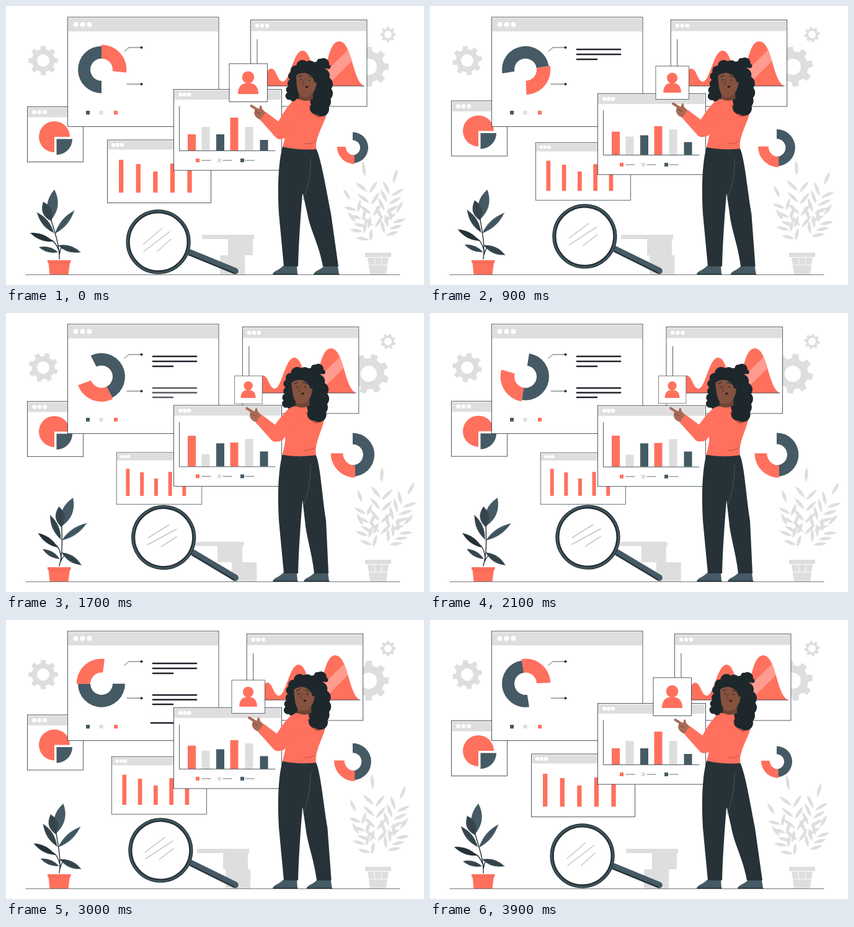
Recreate the animation shown at these times as an HTML page. Size 674 by 450 pixels, loop 4 s.

```html
<!DOCTYPE html>
<html lang="en">
<head>
<meta charset="utf-8">
<title>Data dashboard</title>
<style>
html, body { margin: 0; width: 100%; height: 100%; overflow: hidden; background: #fff; }
svg { display: block; width: 674px; height: 450px; }
</style>
</head>
<body>
<svg id="stage" viewBox="0 0 674 450"></svg>
<script>
const LOOP = 4000, STEP = 100;
const CORAL = '#ff705d', DARK = '#263238', SLATE = '#455a64', GREY = '#dedede';
const SKIN = '#85523f', HAND = '#a96a55', HAIR = '#1d272c';
const svg = document.getElementById('stage');

const box = (x, y, w, h, fill, more = '') =>
  `<rect x="${x}" y="${y}" width="${w}" height="${h}" fill="${fill}" ${more}/>`;
const dot = (x, y, r, fill) => `<circle cx="${x}" cy="${y}" r="${r}" fill="${fill}"/>`;
const shape = (d, fill, more = '') => `<path d="${d}" fill="${fill}" ${more}/>`;
const line = (d, w = 0.8, color = DARK) =>
  `<path d="${d}" fill="none" stroke="${color}" stroke-width="${w}" stroke-linecap="round" stroke-linejoin="round"/>`;
const group = (id, body) => `<g id="${id}">${body}</g>`;

// White panel with a grey title bar and three round buttons
function panel(x, y, w, h, bar, dx, gap, r) {
  const buttons = [0, 1, 2].map(i => dot(x + dx + i * gap, y + bar / 2 + 0.5, r, '#fff')).join('');
  return box(x, y, w, h, '#fff') + box(x + 1, y + 1.5, w - 2, bar - 1, GREY) + buttons +
    box(x, y, w, h, 'none', `stroke="${DARK}" stroke-width="0.8"`);
}

// Ring slice around 0,0; angles in degrees clockwise from the top
function slice(a, b, outer, inner, fill) {
  const at = (r, deg) => {
    const t = deg * Math.PI / 180;
    return (r * Math.sin(t)).toFixed(2) + ' ' + (-r * Math.cos(t)).toFixed(2);
  };
  return shape(`M${at(outer, a)}A${outer} ${outer} 0 0 1 ${at(outer, b)}L${at(inner, b)}A${inner} ${inner} 0 0 0 ${at(inner, a)}Z`, fill);
}

function leaf(x0, y0, x1, y1, w, fill, vein) {
  const len = Math.hypot(x1 - x0, y1 - y0);
  const nx = -(y1 - y0) / len * w, ny = (x1 - x0) / len * w;
  const mx = (x0 + x1) / 2, my = (y0 + y1) / 2;
  return shape(`M${x0} ${y0}Q${mx + nx} ${my + ny} ${x1} ${y1}Q${mx - nx} ${my - ny} ${x0} ${y0}Z`, fill) +
    (vein ? line(`M${x0} ${y0}L${x1} ${y1}`, 0.6, vein) : '');
}

// Cog around 0,0
function cog(r, hole, teeth) {
  const pts = [];
  for (let i = 0; i < teeth; i++) {
    [[-0.3, 0.77], [-0.19, 1], [0.19, 1], [0.3, 0.77]].forEach(([o, k]) => {
      const a = (i + o) / teeth * 2 * Math.PI;
      pts.push((r * k * Math.sin(a)).toFixed(1) + ' ' + (-r * k * Math.cos(a)).toFixed(1));
    });
  }
  return shape('M' + pts.join('L') + 'Z', GREY) + dot(0, 0, hole, '#fff');
}

// Leaves in pairs along a twig, with one at its end
function twig(x0, y0, x1, y1, pairs, size) {
  const a = Math.atan2(y1 - y0, x1 - x0);
  const put = (x, y, dir, len) =>
    leaf(x, y, x + len * Math.cos(dir), y + len * Math.sin(dir), 5.5, GREY);
  let out = '';
  for (let i = 0; i < pairs; i++) {
    const k = 0.35 + 0.6 * i / pairs;
    const x = x0 + (x1 - x0) * k, y = y0 + (y1 - y0) * k;
    out += put(x, y, a - 0.75, size) + put(x + 2, y + 3, a + 0.75, size);
  }
  return out + put(x1, y1, a, size);
}

// x, height at rest, height at full swing, colour
const bars = [
  [293, 26, 50.3, CORAL], [315.5, 38, 19, GREY], [339, 26, 37.7, SLATE],
  [361.5, 53, 38, CORAL], [385.5, 38, 44.5, GREY], [409.5, 17, 24.4, SLATE]
];

const cogs = [[60, 88, 24, 10], [616, 46, 12.5, 6], [585, 98, 32.5, 13]];

const legend = (xs, y) => xs.map((x, i) => box(x - 3, y - 3, 6, 6, [CORAL, GREY, SLATE][i])).join('');

const rows = (x, ends, ys) => ys.map((y, i) => line(`M${x + 1} ${y}H${ends[i] - 1}`, 2.7, '#20222c')).join('');

const wave = 'M11 129C20 129 24 101 33 101C42 101 43 122 52 122C63 122 69 72 83.5 72C100 72 100 124 111 124C122 124 122 57 142.5 57C164 57 164 121 183 129Z';

const backdrop =
  cogs.map(([, , r, hole], i) => group('cog' + i, cog(r, hole, 8))).join('') +
  line('M32 433.5H635', 0.8, '#555') +
  group('palm',
    twig(600, 398, 579, 275, 4, 25) + twig(597, 375, 624, 286, 4, 24) +
    twig(596, 380, 555, 313, 3, 21) + twig(600, 385, 629, 334, 3, 22) +
    twig(597, 392, 564, 349, 2, 21)) +
  shape('M579 398H621V405H617L613 433H587L583 405H579Z', GREY) +
  line('M583 405.5H617M585 418H615M594 407L595 417M606 407L605 417', 0.9, '#fff') +
  group('boxLow', box(345, 402, 40, 31, GREY)) +
  group('boxTop', box(316, 369, 84, 7, GREY) + box(358, 375, 40, 27, GREY));

const wavePanel = group('waves',
  panel(0, 22.5, 187.5, 139.5, 17.5, 10.5, 8, 3.2) +
  `<clipPath id="hill"><path d="${wave}"/></clipPath>` + shape(wave, CORAL) +
  shape('M108 119L172 56L182 70L118 134Z', '#ff9c8f', 'clip-path="url(#hill)"') +
  line('M10.5 54V129H183'));

const piePanel = group('pie',
  panel(34.5, 162.5, 90, 89, 16.5, 11, 8.5, 3.4) +
  shape('M78 211V236A25 25 0 1 1 103 211Z', CORAL) +
  shape('M81.5 214.5H107A25.5 25.5 0 0 1 81.5 240Z', SLATE));

const mainPanel =
  panel(99.5, 18, 243.5, 176.5, 22.5, 13, 11, 4) +
  `<g transform="translate(154 102.7)">${group('ring', slice(180, 360, 38, 18, SLATE) + slice(0, 97, 40.3, 18, CORAL))}</g>` +
  line('M191 73L198 67H218M195 126H218') + dot(218.5, 67, 2.1, DARK) + dot(218.5, 126, 2.1, DARK) +
  group('rows0', rows(236, [308, 308, 270], [70, 78, 86])) +
  group('rows1', rows(236, [308, 308, 270], [121, 128.5, 136])) +
  group('rows2', rows(233, [300], [166])) +
  box(129, 169, 6, 6, SLATE) + box(150.5, 169, 6, 6, GREY) + box(174, 169, 6, 6, CORAL);

const smallPanel = group('small',
  panel(163.5, 216, 167, 101.5, 15, 9.5, 7, 3.2) +
  [248, 255, 267, 254, 240].map((y, i) => box(182 + i * 27.6, y, 7.3, 301 - y, CORAL)).join(''));

const barPanel = group('chart',
  panel(270.5, 134.5, 174, 130.5, 16, 10.5, 7, 3.3) +
  bars.map(([x, h, , c], i) => box(x, 233 - h, 13, h, c, `id="bar${i}"`)).join('') +
  line('M279.5 162V233.5H434') +
  legend([309, 344, 381], 249) + line('M316 249H330M350 249H364M386 249H400', 0.7));

const card = group('card',
  box(360, 93, 61.4, 61.4, '#fff', `stroke="${DARK}" stroke-width="0.8"`) +
  dot(390.5, 115, 9.8, CORAL) +
  shape('M374 142C374 129 381 124 390.5 124S407 129 407 142Z', CORAL));

const sideRing = group('side',
  slice(0, 180, 25, 12, SLATE) +
  `<g transform="translate(2.8 -1.6)">${slice(180, 270, 28, 14, CORAL)}</g>`);

const lens = group('lens',
  line('M296 397.5L369.5 427.5', 10.5, SLATE) + line('M296 401.5L368 431', 2, DARK) +
  `<circle cx="245.6" cy="380.5" r="49" fill="#fff" stroke="${DARK}" stroke-width="6.2"/>` +
  `<circle cx="245.6" cy="380.5" r="49.6" fill="none" stroke="${SLATE}" stroke-width="2.2"/>` +
  line('M221 385L251 359M222 396L264 364M244 396L266 376', 0.7, '#777'));

const plant = group('plant',
  line('M86 408C87 390 79 365 72 343M86 396Q80 380 72 377M86 402Q88 388 92 387', 1.4) +
  leaf(72, 346, 78, 296, 17, SLATE) + leaf(73, 347, 60, 316, 15, '#37474f', DARK) +
  leaf(79, 367, 110, 330, 10, SLATE, DARK) + leaf(77, 366, 50, 333, 10, '#37474f', DARK) +
  leaf(76, 380, 39, 366, 9, DARK) + leaf(84, 397, 53, 389, 8, '#37474f') +
  leaf(84, 386, 120, 397, 10, '#37474f', DARK)) +
  shape('M67 410H104.5V414H103L100.5 433H70.5L68.5 414H67Z', CORAL) + line('M69 414.5H102', 0.6, '#d95c4c');

const curls = [
  [478, 97, 10], [467, 104, 8], [462, 113, 7], [461, 125, 7], [458, 135, 6.5], [457, 145, 6.5], [463, 149, 5],
  [490, 98, 10], [500, 102, 12], [511, 112, 11], [515, 126, 12], [515, 141, 12], [511, 154, 13],
  [509, 166, 12], [500, 165, 10], [512, 93, 9], [506, 90, 5], [520, 98, 3.5]
].map(c => dot(...c, HAIR)).join('');

const head =
  shape('M464 110C470 92 496 90 508 102C524 112 526 160 512 172C500 178 491 166 490 150H466Q456 150 458 136Z', HAIR) + curls +
  shape('M473 134L495 130V150Q484 156 472 150Z', '#6f4434') +
  shape('M468 112Q472 102 484 103Q500 106 501 122C500 137 492 147 481 147C471 147 468 134 468 112Z', SKIN) +
  shape('M465 114C468 98 496 94 503 122L498 124Q495 111 483 108Q473 107 465 114Z', HAIR) +
  line('M472 114L478 112M487 113L493 115', 1.2) + dot(475.5, 119, 1.3, DARK) + dot(489.5, 120, 1.3, DARK) +
  line('M481 118L478 126L481 127', 0.8, '#54301f') +
  `<ellipse cx="485" cy="130.5" rx="2.4" ry="1.8" fill="#3a1c18"/>`;

const woman =
  shape('M430 433C431 427 441 426 447 419H469L470 433Z', SLATE) + line('M431 432.5H470', 1.4) +
  group('shoe', shape('M496 433C497 427 508 426 513 419H535L537 433Z', SLATE) + line('M497 432.5H537', 1.4)) +
  `<path id="leg" fill="${DARK}"/>` +
  shape('M446 227C438 256 438 300 440 335L448 420H471C472 380 475 340 478 303L492 300L500 229Z', DARK) +
  line('M491 246C492 270 485 300 479 312', 0.7, '#52646c') +
  group('body',
    shape('M466 150C456 156 452 170 452 205L446 227Q470 233 500 231L500 222C504 200 516 185 517 172C512 158 500 150 490 149Z', CORAL) +
    shape('M488 160L515 168Q513 178 505 180Q494 178 488 160Z', '#b9503f') +
    line('M482 222Q491 223 498 219', 0.8, '#a8483b') + head) +
  `<path id="upper" fill="none" stroke="${CORAL}" stroke-width="24" stroke-linecap="round"/>` +
  group('arm',
    line('M395.5 161L405 167', 4, HAND) +
    shape('M402 164L408 166L410 160Q413 161 413 166L420 173L413 184Q402 182 400 173Z', HAND) +
    line('M403 170L409 173', 0.7, '#54301f') +
    shape('M419 171L443 189L452 207Q445 219 436 213L410 184Z', CORAL));

svg.innerHTML = backdrop + plant + wavePanel + piePanel + mainPanel + smallPanel + barPanel + card + sideRing + lens + woman;

const part = {};
svg.querySelectorAll('[id]').forEach(e => part[e.id] = e);
const move = (id, value) => part[id].setAttribute('transform', value);
const clamp = v => Math.max(0, Math.min(1, v));
const scaleAt = (x, y, s) => `translate(${x} ${y}) scale(${s}) translate(${-x} ${-y})`;

function draw(ms) {
  const t = Math.floor(ms % LOOP / STEP) * STEP;
  const turn = t / LOOP * 360;
  // Swing out and back, taken at the middle of each step
  const p = (1 - Math.cos(2 * Math.PI * (t + STEP / 2) / LOOP)) / 2;
  const q = p * (2 - p);

  cogs.forEach(([x, y], i) => move('cog' + i, `translate(${x} ${y}) rotate(${turn})`));
  move('ring', `rotate(${turn})`);
  move('waves', `translate(${394.5 - 13.7 * p} 0)`);
  move('pie', `translate(0 ${-20.6 * p})`);
  move('small', scaleAt(247, 266.7, 1 - 0.183 * p));
  move('chart', `translate(0 ${15 * p})`);
  bars.forEach(([, a, b], i) => {
    const h = a + (b - a) * p;
    part['bar' + i].setAttribute('y', 233 - h);
    part['bar' + i].setAttribute('height', h);
  });
  move('card', scaleAt(390.7, 123.7, 1 - 0.28 * p));
  move('side', `translate(559 228.5) scale(${1 + 0.42 * p})`);
  move('lens', `rotate(${9 * p} 372 428)`);
  move('plant', `rotate(${16.2 * p} 86 407)`);
  move('palm', `rotate(${12.7 * p} 600 398)`);
  move('boxTop', `translate(${-17.5 * p} 0)`);
  move('boxLow', `translate(${20 * p} 0)`);

  const out = clamp((3700 - t) / 400);
  [500, 1400, 2300].forEach((start, i) =>
    part['rows' + i].setAttribute('opacity', Math.min(clamp((t - start) / 400), out)));

  move('shoe', `translate(${-16 * q} 0)`);
  move('body', `rotate(${-3.8 * p} 474 232)`);
  move('arm', `translate(${-7.5 * p} ${-7.5 * p})`);
  part.upper.setAttribute('d', `M${468 - 4.5 * p} ${165 - 1.5 * p}Q${456 - 5 * p} ${178 - 3 * p} ${445 - 7 * p} ${202 - 7 * p}`);
  part.leg.setAttribute('d',
    `M470 230L500 230C${508 - q} 245 ${517 - 7 * q} 300 ${524 - 8 * q} 335L${536 - 16 * q} 420H${511 - 14 * q}` +
    `C${505 - 12 * q} 385 ${490 - 6 * q} 360 ${486 - 4 * q} 335L478 300Z`);
}

const start = performance.now();
function tick() {
  draw(performance.now() - start);
  requestAnimationFrame(tick);
}
tick();
</script>
</body>
</html>
```
